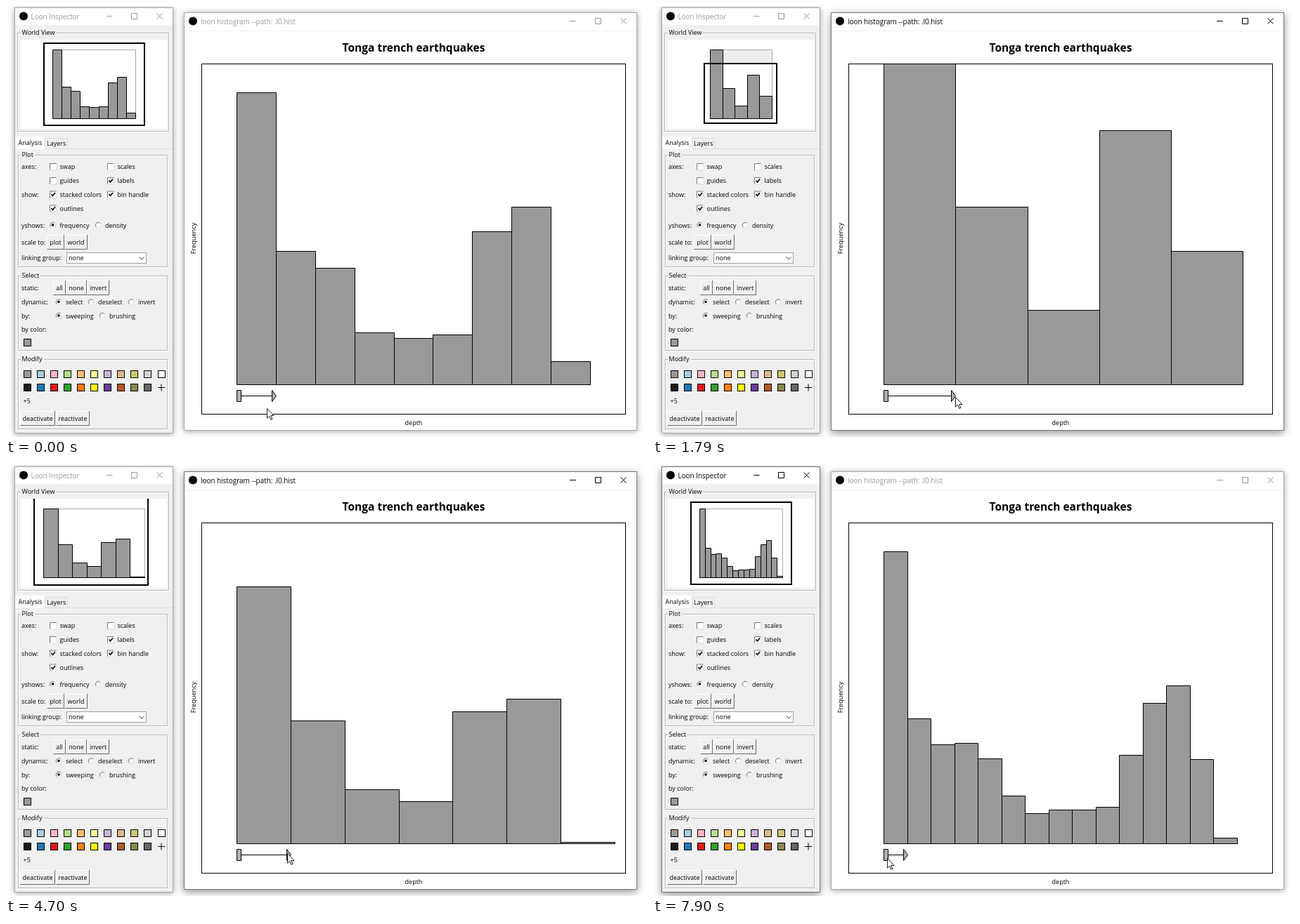
An HTML page for the animation above (8 s loop, 912x614 px).

```html
<!DOCTYPE html>
<html lang="en">
<head>
<meta charset="utf-8">
<title>loon histogram</title>
<style>
html, body { margin: 0; width: 100%; height: 100%; overflow: hidden; background: #fff; }
svg { display: block; width: 912px; height: 614px; font: 9px "Open Sans", "Noto Sans", sans-serif; }
.win rect.frame { fill: #fff; stroke: #a8a8a8; filter: drop-shadow(0 1px 4px rgba(0,0,0,.38)); }
.win .bar { fill: #999; font-size: 9.9px; }
.win .ctl { fill: none; stroke: #999; }
.win.on rect.frame { stroke: #777; filter: drop-shadow(0 3px 6px rgba(0,0,0,.45)); }
.win.on .bar { fill: #000; }
.win.on .ctl { stroke: #000; }
.group { fill: none; stroke: #b8b8b8; }
.cols { fill: #999; stroke: #000; }
.line { fill: none; stroke: #000; }
.handle { fill: #b0b0b0; stroke: #000; }
#combo { fill: #fff; stroke: #a0a0a0; }
#combo.hot { stroke: #222; }
</style>
</head>
<body>
<svg viewBox="0 0 912 614">
  <defs>
    <clipPath id="plotClip"><rect x="279" y="82" width="603" height="499"/></clipPath>
    <clipPath id="miniClip"><rect x="21" y="48" width="208" height="126"/></clipPath>
  </defs>

  <g id="hist" class="win">
    <rect class="frame" x="253.5" y="9.5" width="644" height="595"/>
    <path d="M254 35.5H897" stroke="#f1f1f1"/>
    <circle cx="266" cy="21.5" r="6"/>
    <text class="bar" x="277" y="25.5">loon histogram --path: .l0.hist</text>
    <path class="ctl" d="M802 21.5H811M838.5 17.5H846.5V25.5H838.5ZM874.5 17.5L882.5 25.5M882.5 17.5L874.5 25.5"/>
    <text x="580" y="65" text-anchor="middle" font-size="15.5" font-weight="700">Tonga trench earthquakes</text>
    <text x="580" y="596.5" text-anchor="middle">depth</text>
    <text transform="translate(270 331) rotate(-90)" text-anchor="middle" font-size="9.2">Frequency</text>
    <path id="bars" class="cols" clip-path="url(#plotClip)"/>
    <path class="handle" d="M328.5 547.5H334.5V563.5H328.5Z"/>
    <path id="shaft" class="line"/>
    <path id="arrow" class="handle"/>
    <rect class="line" x="278.5" y="82.5" width="603" height="499"/>
  </g>

  <g id="insp" class="win">
    <rect class="frame" x="12.5" y="2.5" width="225" height="606"/>
    <rect x="13" y="27" width="224" height="581" fill="#f0f0f0"/>
    <circle cx="25" cy="14.5" r="6"/>
    <text class="bar" x="35.5" y="18.5">Loon Inspector</text>
    <path class="ctl" d="M143 14.5H151.5M178.5 10.5H186.5V18.5H178.5ZM214.5 10.5L222.5 18.5M222.5 10.5L214.5 18.5"/>
    <g id="panel"></g>
    <rect x="21" y="48" width="208" height="127" fill="#fff"/>
    <g clip-path="url(#miniClip)">
      <path id="worldFill" fill="#eee"/>
      <path id="viewFill" fill="#fff"/>
      <path id="world" fill="none" stroke="#aaa"/>
      <path id="mini" class="cols"/>
      <path id="view" class="line" stroke-width="2"/>
    </g>
  </g>

  <path id="cursor" d="M0 0V13.6L3.1 10.8L5.3 15.8L7.4 14.9L5.2 10H9.5Z" fill="#fff" stroke="#000" stroke-width=".9"/>
</svg>

<script>
const $ = id => document.getElementById(id);
const set = (id, d) => $(id).setAttribute('d', d);
const box = (x0, y0, x1, y1) => `M${x0} ${y0}H${x1}V${y1}H${x0}Z`;

// ---- static inspector controls ----
const label = (x, y, s) => `<text x="${x}" y="${y + 3.2}">${s}</text>`;

const group = (x0, y0, x1, y1, s, w) =>
  `<path stroke="#fff" fill="none" d="${box(x0 + 1.5, y0 + 1.5, x1 + 1.5, y1 + 1.5)}"/>` +
  `<path class="group" d="${box(x0 + .5, y0 + .5, x1 + .5, y1 + .5)}"/>` +
  `<rect x="21" y="${y0 - 3}" width="${w}" height="8" fill="#f0f0f0"/>` + label(22.5, y0, s);

const check = (x, y, s, on) =>
  `<rect x="${x - 4.5}" y="${y - 4.5}" width="9" height="9" fill="#fff"/>` +
  `<path d="M${x + 5} ${y - 4}V${y + 5}H${x - 4}" fill="none" stroke="#ddd"/>` +
  `<path d="M${x + 4.5} ${y - 4.5}H${x - 4.5}V${y + 4.5}" fill="none" stroke="#777"/>` +
  (on ? `<path d="M${x - 2.5} ${y - .5}L${x - .5} ${y + 2}L${x + 3} ${y - 2.5}" fill="none" stroke="#000" stroke-width="1.7"/>` : '') +
  label(x + 9.5, y, s);

const radio = (x, y, s, on) =>
  `<circle cx="${x}" cy="${y - .5}" r="4" fill="#fff" stroke="#ddd"/>` +
  `<path d="M${x - 2.8} ${y + 2.3}A4 4 0 0 1 ${x + 2.8} ${y - 3.3}" fill="none" stroke="#777"/>` +
  (on ? `<circle cx="${x}" cy="${y - .5}" r="1.8"/>` : '') + label(x + 10, y, s);

const button = (x0, x1, y, s, id = '') =>
  `<g${id && ` id="${id}"`}><path class="lo" d="M${x0 + .5} ${y + 20.5}H${x1 - .5}V${y}" fill="none" stroke="#696969"/>` +
  `<path class="hi" d="M${x0 + .5} ${y + 20}V${y + .5}H${x1 - 1}" fill="none" stroke="#fff"/>` +
  `<text x="${(x0 + x1) / 2}" y="${y + 13.5}" text-anchor="middle">${s}</text></g>`;

const swatch = (x, y, c) =>
  `<rect x="${x - 5}" y="${y - 5}" width="10" height="10" fill="${c}" stroke="#000"/>`;

const tints = ['#999', '#a6cee3', '#ffb6c5', '#b2df8a', '#fdbf6f', '#ffff99', '#cab2d6', '#deb887', '#cdc673', '#d3d3d3', '#fff'];
const tones = ['#1a1a1a', '#1f78b4', '#e31a1c', '#33a02c', '#ff7f00', '#ffff00', '#6a3d9a', '#b15928', '#8b864e', '#666'];
const row = (colors, y) => colors.map((c, i) => swatch(Math.round(30 + 19.05 * i) + .5, y, c)).join('');

$('panel').innerHTML =
  group(16, 38, 231, 178, 'World View', 50) +
  '<path d="M55 203.5H237" stroke="#dcdcdc"/><rect x="13" y="186" width="42" height="18" fill="#fff"/>' +
  '<path d="M55.5 203V188.5H87.5V203" fill="none" stroke="#d9d9d9"/>' +
  label(17.5, 194.5, 'Analysis') + label(58, 196, 'Layers') +
  group(17, 212, 229, 371, 'Plot', 20) +
  label(22, 229, 'axes:') + label(22, 269, 'show:') +
  check(67, 229, 'swap') + check(149, 229, 'scales') +
  check(67, 249, 'guides') + check(149, 249, 'labels', 1) +
  check(67, 268.5, 'stacked colors', 1) + check(149, 268.5, 'bin handle', 1) +
  check(67, 288.5, 'outlines', 1) +
  label(22, 312.5, 'yshows:') + radio(66.5, 312.5, 'frequency', 1) + radio(131, 312.5, 'density') +
  label(22, 336.5, 'scale to:') + button(58, 83, 326, 'plot') + button(83, 116, 326, 'world', 'scaleBtn') +
  label(22, 359, 'linking group:') +
  '<rect id="combo" x="86.5" y="351.5" width="113" height="15"/>' + label(89, 359, 'none') +
  '<path d="M189.5 357.5L193 361L196.5 357.5" fill="none" stroke="#444"/>' +
  group(17, 384, 229, 490, 'Select', 27) +
  label(22, 401.5, 'static:') + button(67, 85, 391, 'all') + button(85, 115, 391, 'none') + button(115, 147, 391, 'invert') +
  label(22, 422, 'dynamic:') + radio(75, 422, 'select', 1) + radio(121, 422, 'deselect') + radio(178, 422, 'invert') +
  label(22, 441.5, 'by:') + radio(75, 441.5, 'sweeping', 1) + radio(137, 441.5, 'brushing') +
  label(22, 460.5, 'by color:') + swatch(30.5, 479.5, '#999') +
  group(17, 503, 229, 602, 'Modify', 33) +
  row(tints, 524.5) + row(tones, 543.5) +
  '<path d="M216 543.5H226M221 538.5V548.5" stroke="#000"/>' +
  label(24.5, 563, '+5') + button(20, 70, 577, 'deactivate') + button(71, 119, 577, 'reactivate');

// ---- data: quakes per depth slice, rebinned to any bin width ----
const SLICE = 20;
const quakes = [175, 62, 54, 55, 36, 44, 48, 37, 22, 21, 13, 12, 16, 19, 11, 10, 34, 41, 62, 64, 79, 53, 28, 4];
const END = SLICE * quakes.length;
const cum = u => quakes.reduce((sum, n, i) => sum + n * Math.max(0, Math.min(1, u / SLICE - i)), 0);
const counts = bin =>
  Array.from({ length: Math.ceil(END / bin) }, (_, i) => cum((i + 1) * bin) - cum(i * bin));

// ---- timeline: start, end and number of steps of each action ----
const drags = [
  { t0: 1090, t1: 1790, n: 6, from: 55.9, to: 102.3, y: 557 },
  { t0: 4550, t1: 5490, n: 8, from: 86.8, to: 32.86, y: 553 }
];
const moves = [
  { t0: 120, t1: 690, n: 5, path: [[371, 573], [369, 571], [380, 558]] },
  { t0: 2310, t1: 3180, n: 8, path: [[430, 557], [300, 450], [150, 358], [112, 306], [99, 333]] },
  { t0: 3610, t1: 4240, n: 6, path: [[99, 333], [426, 553]] },
  { t0: 5890, t1: 6700, n: 7, path: [[360, 553], [101, 340]] },
  { t0: 6970, t1: 7900, n: 8, path: [[101, 340], [150, 400], [290, 577], [333, 560]] }
];
const rescales = [0, 3610, 6820];

const latest = (list, t) => list.filter(a => a.t0 <= t).pop();
const step = (a, t) => Math.min(a.n - 1, Math.floor((t - a.t0) / (a.t1 - a.t0) * (a.n - 1) + 1e-6));

function dragged(d, i) {
  const p = Math.min(1, i / (d.n - 1));
  return d.to + (d.from - d.to) * (1 - p) ** 1.134;
}

function binAt(t) {
  const d = latest(drags, t);
  return d ? dragged(d, step(d, t)) : drags[0].from;
}

// zoom that fits the histogram of the last rescale into the plot
function zoomAt(t) {
  const bin = binAt(rescales.filter(r => r <= t).pop());
  const c = counts(bin);
  return [503 / (c.length * bin), 416 / Math.max(...c)];
}

function along(pts, p) {
  const len = pts.slice(1).map((b, i) => Math.hypot(b[0] - pts[i][0], b[1] - pts[i][1]));
  let d = p * len.reduce((a, b) => a + b), i = 0;
  while (i < len.length - 1 && d > len[i]) d -= len[i++];
  const k = Math.min(1, d / len[i]);
  return [0, 1].map(j => Math.round(pts[i][j] + (pts[i + 1][j] - pts[i][j]) * k));
}

// while dragging, the pointer runs slightly ahead of the handle
function pointer(t, kx) {
  const a = latest([...drags, ...moves].sort((a, b) => a.t0 - b.t0), t);
  if (!a) return moves[0].path[0];
  const i = step(a, t);
  return a.path ? along(a.path, (i + 1) / a.n) : [Math.round(328 + dragged(a, i + .6) * kx), a.y];
}

function drawPlot(hs, w) {
  const base = 539.5;
  const edge = i => 328.5 + Math.round(i * w);
  set('bars', hs.map((h, i) => box(edge(i), base - Math.round(h), edge(i + 1), base)).join(''));
  const tip = edge(1);
  set('shaft', `M335 555.5H${tip - 6}`);
  set('arrow', `M${tip - 6} 547.5L${tip} 555.5L${tip - 6} 563.5Z`);
}

function drawWorld(hs, w, partial) {
  const W = hs.length * w, H = Math.max(...hs);
  const s = Math.min(98 / H, 179 / W);
  const x0 = 125.5 - W * s / 2, y1 = 111.5 + H * s / 2;
  const snap = v => Math.floor(v) + .5;
  const col = (a, b, h) => box(snap(x0 + a * s), snap(y1 - h * s), snap(x0 + b * s), snap(y1));
  const world = col(0, W, H);
  const view = box(...[x0 - 50 * s, y1 - 458 * s, x0 + 554 * s, y1 + 41 * s].map(Math.round));
  const shown = partial ? hs.slice(0, 1) : hs;
  set('worldFill', world);
  set('world', world);
  set('viewFill', view);
  set('view', partial ? '' : view);
  set('mini', shown.map((h, i) => col(i * w, (i + 1) * w, h)).join(''));
}

function draw(t) {
  const [kx, ky] = zoomAt(t);
  const bin = binAt(t);
  const hs = counts(bin).map(c => c * ky);
  drawPlot(hs, bin * kx);
  drawWorld(hs, bin * kx, t >= 5490 && t < 5610);

  // window focus, button press, hover
  $('hist').classList.toggle('on', t >= 1090 && t < 3460 || t >= 4550 && t < 6820);
  $('insp').classList.toggle('on', t >= 3460 && t < 4550 || t >= 6820);
  const down = t >= 3460 && t < 3610;
  $('scaleBtn').querySelector('.hi').setAttribute('stroke', down ? '#696969' : '#fff');
  $('scaleBtn').querySelector('.lo').setAttribute('stroke', down ? '#fff' : '#696969');
  const [x, y] = pointer(t, kx);
  $('combo').classList.toggle('hot', x >= 86 && x < 200 && y >= 351 && y < 367);
  $('cursor').setAttribute('transform', `translate(${x + .5} ${y + .5})`);
}

function tick() {
  draw(performance.now() % 8000);
  requestAnimationFrame(tick);
}
tick();
</script>
</body>
</html>
```
